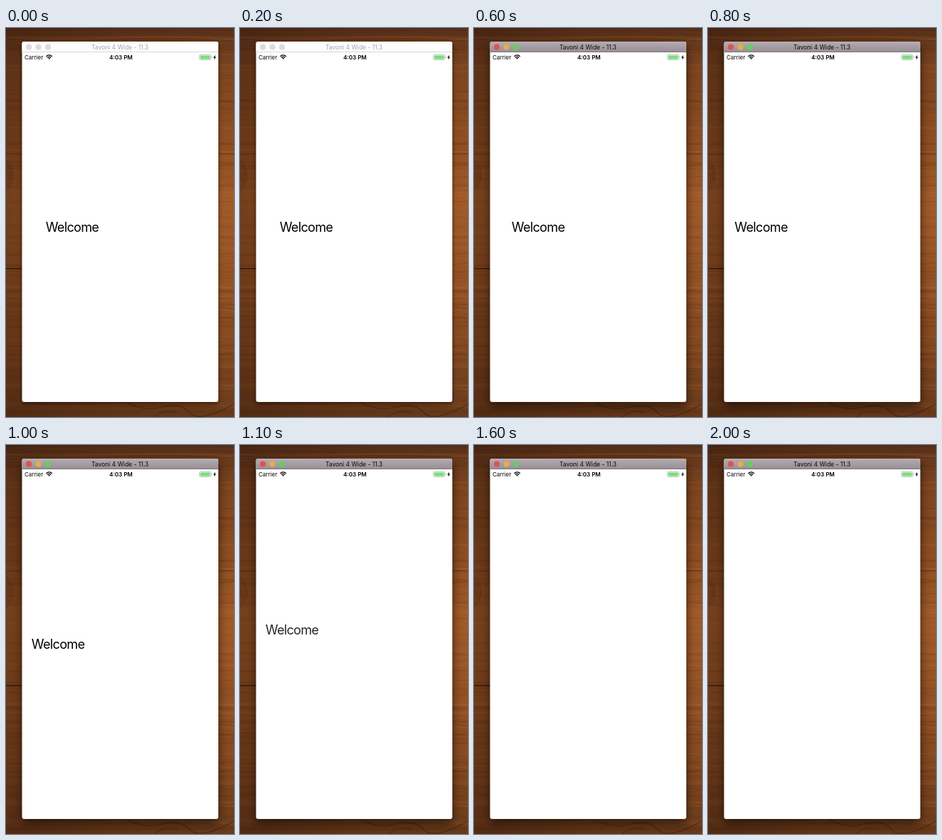
Animation of 320x544 px, one loop 2800 ms. Source, as an HTML page:

```html
<!DOCTYPE html>
<html lang="en">
<head>
<meta charset="utf-8">
<style>
  html, body { margin: 0; width: 100%; height: 100%; overflow: hidden; background: #5a3218; }
  svg { display: block; width: 100vw; height: 100vh; }
  text { font-family: Inter, Roboto, sans-serif; }
  #shadow { filter: drop-shadow(0 3px 3px #0008); }
  .active #shadow { filter: drop-shadow(0 6px 7px #0009); }
  #bar { fill: #fdfdfd; }
  #rule { fill: #d8d8d8; }
  #title { fill: #a6a6a6; font-size: 8.5px; text-anchor: middle; }
  #lights { fill: #dcdcdc; }
  .active #bar { fill: url(#metal); }
  .active #rule { fill: #7d757a; }
  .active #title { fill: #0c0a0c; }
  .active .red { fill: #e2524f; }
  .active .yellow { fill: #e3ae45; }
  .active .green { fill: #5fd25c; }
  .status { font-size: 8px; }
  #welcome { font-size: 18px; letter-spacing: -.036em; }
</style>
</head>
<body>
<svg id="stage" viewBox="0 0 320 544">
  <defs>
    <linearGradient id="wood" x2="0" y2="1">
      <stop offset="0" stop-color="#57301a"/>
      <stop offset=".1" stop-color="#7c451f"/>
      <stop offset=".3" stop-color="#8f4f22"/>
      <stop offset=".45" stop-color="#a05a28"/>
      <stop offset=".6" stop-color="#985526"/>
      <stop offset=".8" stop-color="#854a21"/>
      <stop offset="1" stop-color="#683a1b"/>
    </linearGradient>
    <linearGradient id="shade">
      <stop offset="0" stop-color="#2a1206" stop-opacity=".38"/>
      <stop offset=".5" stop-color="#2a1206" stop-opacity=".12"/>
      <stop offset="1" stop-color="#2a1206" stop-opacity="0"/>
    </linearGradient>
    <linearGradient id="metal" x2="0" y2="1">
      <stop offset="0" stop-color="#b5acb2"/>
      <stop offset="1" stop-color="#978e95"/>
    </linearGradient>
  </defs>

  <rect width="320" height="544" fill="url(#wood)"/>
  <g id="grain" fill="none"></g>
  <rect width="320" height="544" fill="url(#shade)"/>

  <rect id="shadow" x="22.5" y="19" width="275.5" height="504" rx="3" fill="#fff"/>
  <path id="bar" d="M22.5 34V22q0-3 3-3H295q3 0 3 3V34z"/>
  <rect id="rule" x="22.5" y="33" width="275.5" height="1"/>
  <g id="lights">
    <circle class="red" cx="32" cy="26.7" r="4.1"/>
    <circle class="yellow" cx="45.5" cy="26.7" r="4.1"/>
    <circle class="green" cx="59" cy="26.7" r="4.1"/>
  </g>
  <text id="title" x="160" y="29.8">Tavoni 4 Wide - 11.3</text>

  <text class="status" x="26" y="43.8">Carrier</text>
  <g fill="none" stroke="#000" stroke-width="1.3">
    <path d="M56.4 39.8q4.2-3.8 8.4 0M57.9 41.5q2.7-2.3 5.4 0"/>
    <path d="M59.2 42.3q1.4-1 2.8 0L60.6 43.9z" fill="#000" stroke="none"/>
  </g>
  <text class="status" x="161.3" y="43.8" text-anchor="middle" font-weight="600">4:03 PM</text>
  <rect x="271.4" y="37.3" width="16.2" height="7.2" rx="1.8" fill="#fff" stroke="#a5a5a5" stroke-width=".7"/>
  <rect x="272.6" y="38.4" width="13.8" height="5" rx=".8" fill="#74e077"/>
  <path d="M288.4 39.6q1.4 1.3 0 2.6z" fill="#a5a5a5"/>
  <path d="M293.6 37.4l-2.6 4h1.7l-.6 3.2 2.8-4.1h-1.7z"/>

  <text id="welcome" x="55.7" y="285">Welcome</text>
</svg>
<script>
const stage = document.getElementById("stage");
const grain = document.getElementById("grain");
const welcome = document.getElementById("welcome");

let seed = 7;
const random = () => (seed = seed * 16807 % 2147483647) / 2147483647;

function line(d, color, width, opacity) {
  const path = document.createElementNS("http://www.w3.org/2000/svg", "path");
  path.setAttribute("d", d);
  path.setAttribute("stroke", color);
  path.setAttribute("stroke-width", width);
  path.setAttribute("opacity", opacity);
  grain.append(path);
}

for (let i = 0; i < 200; i++) {
  const y = random() * 544, bend = random() * 10 - 5;
  const color = random() < .55 ? "#4a220c" : "#bd7438";
  line(`M-5 ${y}q80 ${bend} 165 0t165 ${bend}`, color, .5 + random() * 2.5, .04 + random() * .12);
}
// Curved grain on the left plank and along the bottom
for (let r = 6; r < 26; r += 6)
  line(`M-2 ${206 - r}Q${r * .9} 206 -2 ${206 + r}`, "#341808", 1, .4);
line("M170 524q25 13 50 6t38 8 62-12M208 544q14-12 32-6", "#341808", 1.2, .5);
// Seams between planks
line("M0 176H320", "#341808", 1, .45);
line("M0 336.5H160", "#1c0c04", 1.6, .8);
line("M160 457H320", "#341808", 1, .35);

// Critically damped spring; time in ms
function spring(time) {
  const s = Math.max(0, time) * .0173;
  return 1 - (1 + s) * Math.exp(-s);
}

function draw(now) {
  const time = Math.floor(now % 2800 / 100) * 100;
  const slide = spring(time - 561), rise = spring(time - 1061);
  stage.classList.toggle("active", time >= 600);
  welcome.setAttribute("transform", `translate(${-20 * slide} ${-133.3 * rise})`);
  welcome.setAttribute("opacity", time < 1500 ? 1 - rise : 0);
  requestAnimationFrame(draw);
}
draw(performance.now());
</script>
</body>
</html>
```
